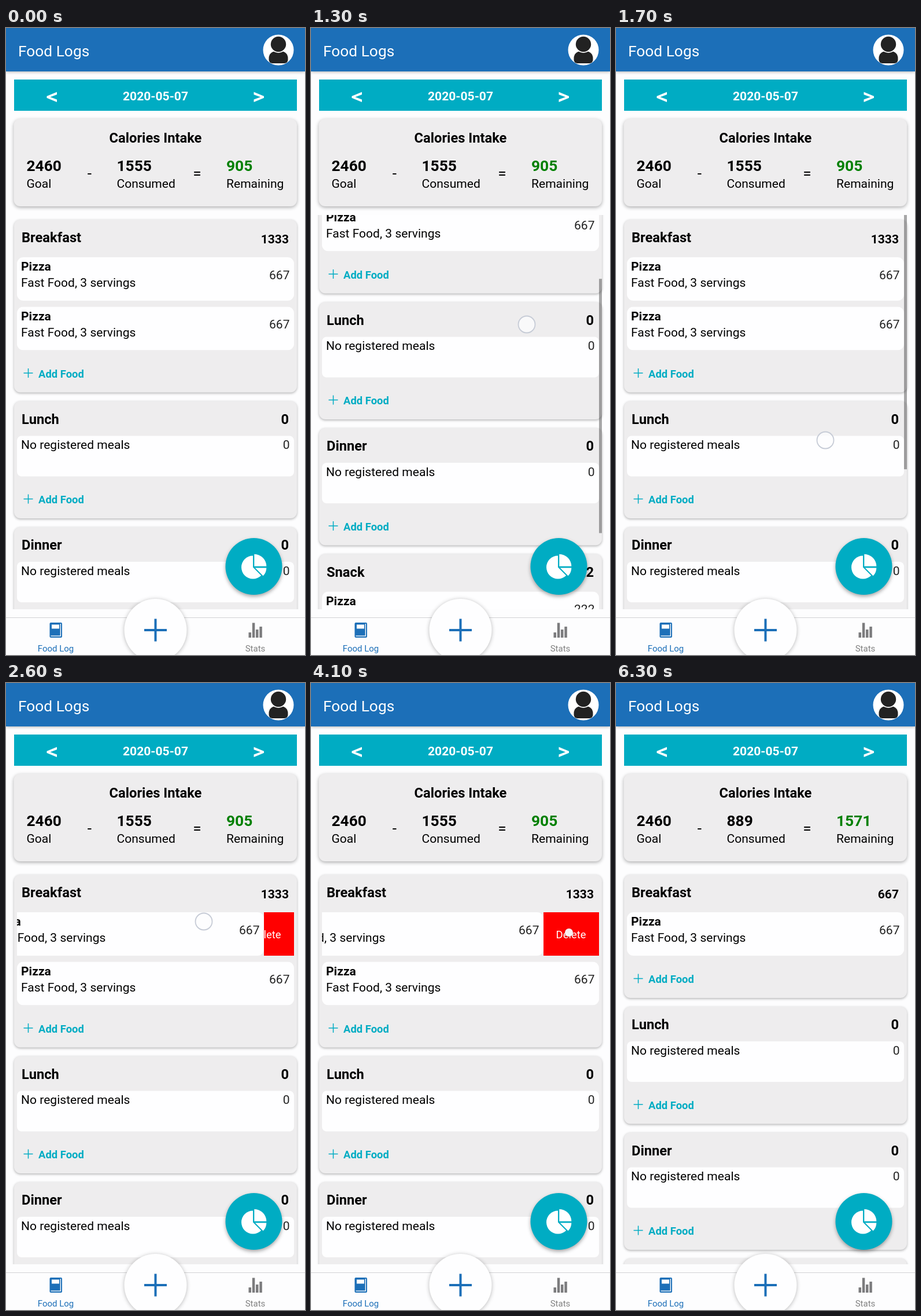
Recreate the animation shown at these times as an HTML page with a canvas. Size 517 px wide and 1083 px high, loop 6.4 s.

```html
<!DOCTYPE html>
<html lang="en">
<head>
<meta charset="utf-8">
<title>Food Logs</title>
<style>
html, body { margin: 0; width: 100%; height: 100%; overflow: hidden; background: #fdfdfe; }
canvas { display: block; }
</style>
</head>
<body>
<canvas id="stage" width="517" height="1083"></canvas>
<script>
const ctx = document.getElementById('stage').getContext('2d');
const LOOP = 6400, STEP = 100, DP = 1.3165;
const BLUE = '#1c6fb8', TEAL = '#00acc3', CARD = '#eeedee', PAGE = '#fdfdfe', WHITE = '#fefeff';
const VIEW = { top: 323, height: 681 };
const DELETED_AT = 4200;

// Keys are [time, value, ...]
const SCROLL = [[800, 0], [900, 37], [1000, 96], [1100, 148], [1200, 176], [1300, 171],
  [1400, 118], [1500, 52], [1600, 8], [1700, 0]];
const SWIPE = [[2400, 0], [2500, 18], [2600, 52], [2700, 84], [2800, 96]];
const BAR = [[700, 0], [800, 1], [2100, 1], [2400, 0], [4100, 0], [4200, 1], [4600, 1], [4800, 0.08], [4900, 0]];
const TOUCHES = [
  [[700, 350, 668], [800, 352, 660], [900, 355, 625], [1000, 360, 566], [1200, 371, 492],
    [1300, 373, 512], [1400, 372, 572], [1600, 364, 690], [1700, 362, 712], [1800, 362, 716]],
  [[2300, 402, 424], [2400, 392, 422], [2800, 292, 402], [3100, 262, 386], [3400, 258, 381]],
  [[3800, 446, 431], [4000, 446, 431]]
];

function track(keys, t, col = 1) {
  if (t <= keys[0][0]) return keys[0][col];
  for (let i = 1; i < keys.length; i++) {
    const a = keys[i - 1], b = keys[i];
    if (t <= b[0]) return a[col] + (b[col] - a[col]) * (t - a[0]) / (b[0] - a[0]);
  }
  return keys[keys.length - 1][col];
}

function text(str, x, y, dp, { bold = false, color = '#000', align = 'left' } = {}) {
  ctx.font = `${bold ? 700 : 400} ${dp * DP}px Roboto, sans-serif`;
  ctx.textAlign = align;
  ctx.fillStyle = color;
  ctx.fillText(str, x, y);
}

function rect(x, y, w, h, color) {
  ctx.fillStyle = color;
  ctx.fillRect(x, y, w, h);
}

function box(x, y, w, h, r, color) {
  ctx.fillStyle = color;
  ctx.beginPath();
  ctx.roundRect(x, y, w, h, r);
  ctx.fill();
}

function disc(x, y, r, color) {
  ctx.fillStyle = color;
  ctx.beginPath();
  ctx.arc(x, y, r, 0, Math.PI * 2);
  ctx.fill();
}

function shadowed(alpha, blur, dy, draw) {
  ctx.save();
  ctx.shadowColor = `rgba(0,0,0,${alpha})`;
  ctx.shadowBlur = blur;
  ctx.shadowOffsetY = dy;
  draw();
  ctx.restore();
}

function clipped(x, y, w, h, draw) {
  ctx.save();
  ctx.beginPath();
  ctx.rect(x, y, w, h);
  ctx.clip();
  draw();
  ctx.restore();
}

function plus(x, y, arm, width, color) {
  ctx.strokeStyle = color;
  ctx.lineWidth = width;
  ctx.beginPath();
  ctx.moveTo(x - arm, y);
  ctx.lineTo(x + arm, y);
  ctx.moveTo(x, y - arm);
  ctx.lineTo(x, y + arm);
  ctx.stroke();
}

function header() {
  shadowed(0.3, 5, 1, () => rect(0, 0, 517, 75, BLUE));
  text('Food Logs', 21, 48.5, 20, { color: '#fff' });
  disc(471, 38, 26.5, '#fff');
  box(454.5, 40, 33, 21, [12, 12, 6, 6], '#222');
  disc(471, 28, 15, '#fff');
  disc(471, 28, 13.2, '#222');
}

function chevron(flip) {
  const pts = [[88, 110.5], [70.5, 117.7], [70.5, 120.8], [88, 128], [88, 123.5], [76.5, 119.2], [88, 115]];
  ctx.fillStyle = '#fff';
  ctx.beginPath();
  pts.forEach(([x, y]) => ctx.lineTo(flip ? 516.5 - x : x, y));
  ctx.fill();
}

function dateBar() {
  rect(14, 89, 489, 54, TEAL);
  chevron(false);
  chevron(true);
  text('2020-05-07', 258.5, 124.5, 16, { bold: true, color: '#fff', align: 'center' });
}

function summary(deleted) {
  shadowed(0.32, 6, 2, () => box(13.5, 157, 489.5, 151, 11, CARD));
  text('Calories Intake', 258.5, 197.5, 18, { bold: true, align: 'center' });
  const parts = [
    [36, '2460', 'Goal', '#000'],
    [192, deleted ? '889' : '1555', 'Consumed', '#000'],
    [381.5, deleted ? '1571' : '905', 'Remaining', '#008000']
  ];
  for (const [x, num, label, color] of parts) {
    text(num, x - 0.5, 246.5, 20, { bold: true, color });
    text(label, x - 0.5, 276, 16);
  }
  text('-', 144.5, 260, 20, { align: 'center' });
  text('=', 330.5, 260, 20, { align: 'center' });
}

function foodRow(y, kcal, swipe) {
  clipped(19, y, 479, 75, () => {
    if (swipe > 0) {
      clipped(498 - swipe, y, swipe, 75, () => {
        rect(402, y, 96, 75, '#f00');
        text('Delete', 449.5, y + 45, 14, { color: '#fff', align: 'center' });
      });
    }
    ctx.translate(-swipe, 0);
    box(19, y, 479, 75, 11, WHITE);
    text('Pizza', 26, y + 23, 16, { bold: true });
    text('Fast Food, 3 servings', 26, y + 51.3, 16);
    text(kcal, 490.5, y + 37.5, 16, { color: '#222', align: 'right' });
  });
}

// Draws one meal card and returns the top of the next one.
function mealCard(y, { name, total, rows, small }, swipe) {
  const head = rows.length ? 65 : 60;
  const body = rows.length ? rows.length * 85.5 : 80;
  const addY = y + head + body + 29.5;
  shadowed(0.3, 4, 1.5, () => box(14, y, 489, head + body + 62.5, 11, CARD));
  text(name, 27, y + 39.3, 18, { bold: true });
  text(total, 489, y + (small ? 40.5 : 39.3), small ? 16 : 18, { bold: true, align: 'right' });
  rows.forEach((kcal, i) => foodRow(y + head + i * 85.5, kcal, i ? 0 : swipe));
  if (!rows.length) {
    box(19, y + head, 479, 70, 8, WHITE);
    text('No registered meals', 26, y + head + 22.5, 16);
    text('0', 490.5, y + head + 22.5, 16, { color: '#222', align: 'right' });
  }
  plus(38.5, addY - 0.5, 8, 1.5, TEAL);
  text('Add Food', 56, addY + 7, 14, { bold: true, color: TEAL });
  return addY + 48;
}

function mealList(t, deleted) {
  const scroll = track(SCROLL, t);
  const swipe = deleted ? 0 : track(SWIPE, t);
  const meals = [
    { name: 'Breakfast', total: deleted ? '667' : '1333', rows: deleted ? ['667'] : ['667', '667'], small: true },
    { name: 'Lunch', total: '0', rows: [] },
    { name: 'Dinner', total: '0', rows: [] },
    { name: 'Snack', total: '222', rows: ['222'] }
  ];
  clipped(0, VIEW.top, 517, VIEW.height, () => {
    let y = 331 - scroll;
    meals.forEach((meal, i) => { y = mealCard(y, meal, i ? 0 : swipe); });
    const ratio = VIEW.height / (deleted ? 970.5 : 1056);
    const alpha = 0.34 * track(BAR, t);
    rect(498, VIEW.top + scroll * ratio, 5, VIEW.height * ratio, `rgba(0,0,0,${alpha})`);
  });
}

function wedge(x, y, r, from, to) {
  ctx.beginPath();
  ctx.moveTo(x, y);
  ctx.arc(x, y, r, from * Math.PI, to * Math.PI);
  ctx.fill();
}

function pieButton() {
  shadowed(0.35, 6, 3, () => disc(428.5, 930, 49, TEAL));
  ctx.fillStyle = '#fff';
  wedge(427, 931.5, 20, 0.25, 1.5);
  wedge(429.3, 929.8, 21, 1.5, 2);
  wedge(430.8, 932.5, 19.5, 0, 0.25);
}

function tabs() {
  rect(0, 1018, 517, 65, PAGE);
  rect(0, 1018, 517, 1, '#d2d2d4');
  box(75.5, 1027, 21.5, 26, 2, BLUE);
  rect(79, 1030.5, 13, 7, '#fff');
  rect(93.7, 1029, 1.3, 21, '#fff');
  rect(77.5, 1049.5, 17.5, 1.3, '#fff');
  text('Food Log', 86, 1077, 11.4, { color: BLUE, align: 'center' });
  [[419.5, 1044], [425.8, 1027.5], [432, 1039], [438.3, 1034]].forEach(([x, y]) => rect(x, y, 4.5, 1053 - y, '#7c7c7e'));
  text('Stats', 431, 1077, 11.4, { color: '#808080', align: 'center' });
  shadowed(0.28, 7, 1, () => disc(258.5, 1040, 54, WHITE));
  plus(258.5, 1040, 19.5, 4, BLUE);
}

function touch(t) {
  for (const keys of TOUCHES) {
    const end = keys[keys.length - 1][0];
    if (t < keys[0][0] || t > end + STEP) continue;
    const x = track(keys, t, 1), y = track(keys, t, 2);
    if (t > end) {
      shadowed(0.25, 4, 1, () => disc(x, y, 7, 'rgba(250,250,252,0.95)'));
    } else {
      disc(x, y, 14.5, 'rgba(252,252,254,0.75)');
      ctx.strokeStyle = '#c6cbd6';
      ctx.lineWidth = 1.8;
      ctx.stroke();
    }
  }
}

function draw(now) {
  const t = Math.floor((now % LOOP) / STEP) * STEP;
  const deleted = t >= DELETED_AT;
  rect(0, 0, 517, 1083, PAGE);
  header();
  dateBar();
  summary(deleted);
  mealList(t, deleted);
  pieButton();
  tabs();
  touch(t);
}

let start;
function loop(now) {
  start ??= now;
  draw(now - start);
  requestAnimationFrame(loop);
}
draw(0);
requestAnimationFrame(loop);
</script>
</body>
</html>
```
